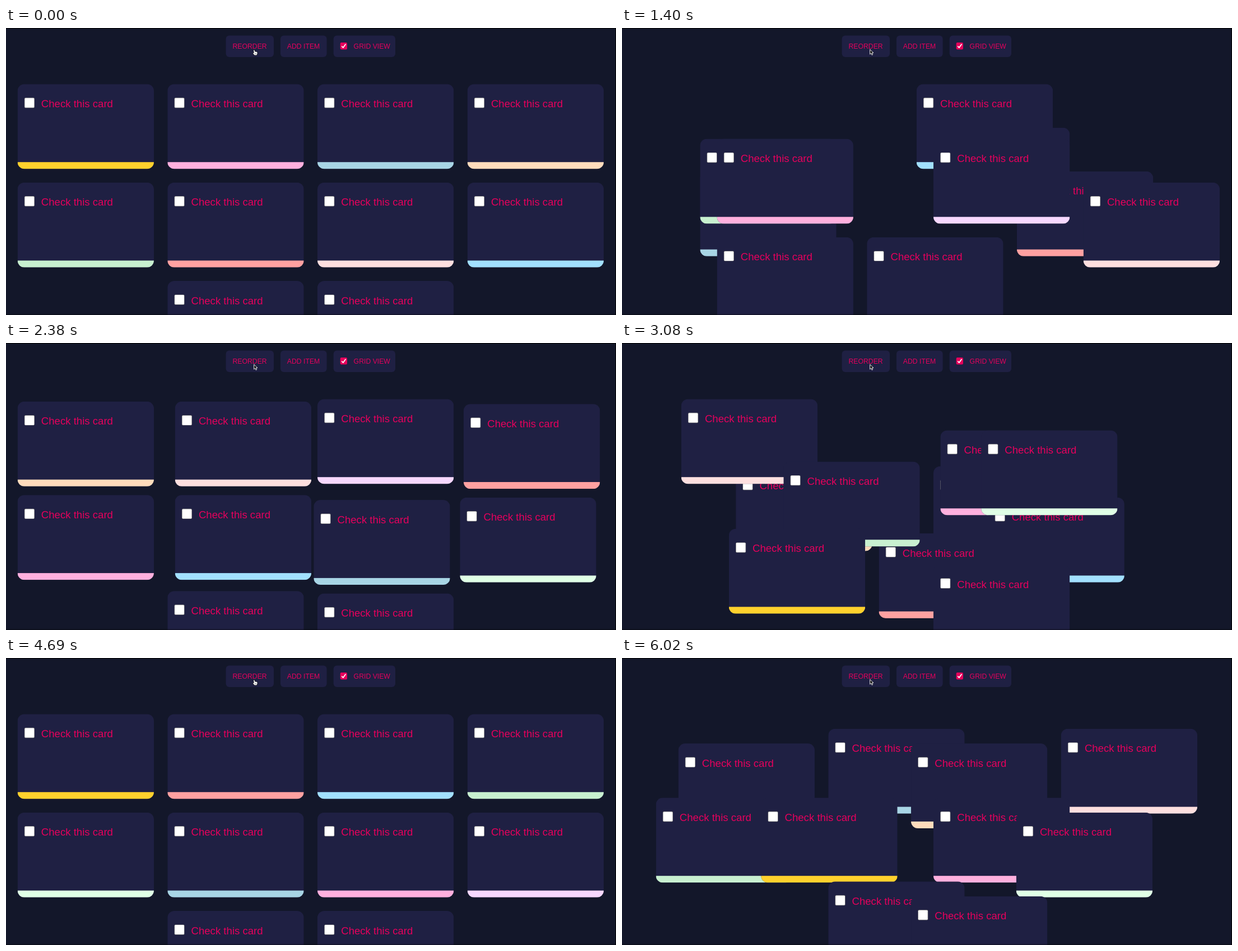
These frames come from a looping animation (1089 px wide and 514 px high, 6090 ms). An HTML page with a canvas:

```html
<!DOCTYPE html>
<html lang="en">
<head>
<meta charset="utf-8">
<title>Card shuffle</title>
<style>
  html, body { margin: 0; width: 100%; height: 100%; overflow: hidden; background: #13172a; }
  canvas { display: block; width: 1089px; height: 514px; }
</style>
</head>
<body>
<canvas id="stage" width="1089" height="514"></canvas>
<script>
const ctx = document.getElementById('stage').getContext('2d');
const WIDTH = 1089, HEIGHT = 514;
const LOOP = 6090, TICK = 70, MOVE = 400;
const PANEL = '#1f2043', ACCENT = '#e6005c';
const FONT = '"Liberation Sans", Arial, sans-serif';
const CARD = { w: 243.4, h: 152, r: 12.2, bar: 12.2 };

const colors = {
  Y: '#ffd12d', P: '#ffb0de', T: '#a8d5e5', O: '#ffdcbc', G: '#c8f0d0',
  S: '#ffa1a1', R: '#fddfdf', B: '#a2e0ff', L: '#f7d8ff', M: '#e0ffe6'
};

// Each shuffle moves the cards from the previous order into this one.
const firstOrder = 'YPTOGSRBLM';
const shuffles = [
  { at: 220, order: 'TBYSGPLROM' },
  { at: 1329, order: 'PGLBOMYRTS' },
  { at: 2097, order: 'ORLSPBTMGY' },
  { at: 2953, order: 'RGMPYOLBST' },
  { at: 3849, order: 'YSBGMTPLRO' },
  { at: 4809, order: 'STORGYPMLB' },
  { at: 5999, order: 'YGPLMBRTOS' }
];

function slot(i) {
  const row = Math.floor(i / 4);
  const col = i % 4 + (row === 2 ? 1 : 0); // the short last row is centred
  return { x: 20.6 + col * 267.7, y: 100.4 + row * 176.3 };
}

function roundRect(x, y, w, h, r) {
  ctx.beginPath();
  ctx.roundRect(x, y, w, h, r);
}

function fillRound(x, y, w, h, r, color) {
  ctx.fillStyle = color;
  roundRect(x, y, w, h, r);
  ctx.fill();
}

function label(text, x, y, size) {
  ctx.font = `${size}px ${FONT}`;
  ctx.fillStyle = ACCENT;
  ctx.fillText(text, x, y);
}

function drawCard(x, y, color) {
  ctx.save();
  roundRect(x, y, CARD.w, CARD.h, CARD.r);
  ctx.clip();
  ctx.fillStyle = PANEL;
  ctx.fillRect(x, y, CARD.w, CARD.h);
  ctx.fillStyle = color;
  ctx.fillRect(x, y + CARD.h - CARD.bar, CARD.w, CARD.bar);
  ctx.restore();

  fillRound(x + 12.2, y + 24.4, 18.2, 18.4, 2, '#767676');
  fillRound(x + 12.9, y + 25.1, 16.8, 17, 1.5, '#fff');
  label('Check this card', x + 42.2, y + 41.6, 18.6);
}

function drawToolbar() {
  fillRound(392.6, 13.6, 85.4, 38.4, 6, PANEL);
  fillRound(490, 13.6, 82.6, 38.4, 6, PANEL);
  fillRound(584.7, 13.6, 110.3, 38.4, 6, PANEL);
  label('REORDER', 404.4, 37.2, 12.25);
  label('ADD ITEM', 501.8, 37.2, 12.25);
  label('GRID VIEW', 620.6, 37.2, 12.25);

  fillRound(596.7, 26, 12.3, 12.4, 2, ACCENT);
  ctx.strokeStyle = '#fff';
  ctx.lineWidth = 1.8;
  ctx.beginPath();
  ctx.moveTo(599.3, 32.5);
  ctx.lineTo(601.8, 35.2);
  ctx.lineTo(606.5, 28.8);
  ctx.stroke();
}

function polygon(points) {
  ctx.beginPath();
  points.forEach(([x, y]) => ctx.lineTo(x, y));
  ctx.closePath();
}

function drawArrow() {
  polygon([[442.7, 38.4], [442.7, 47], [444.7, 45.2], [446.1, 48.4],
    [447.6, 47.7], [446.2, 44.7], [449, 44.5]]);
  ctx.fillStyle = '#111';
  ctx.fill();
  ctx.strokeStyle = '#fff';
  ctx.lineWidth = 0.9;
  ctx.stroke();
}

function drawHand() {
  polygon([[442, 39.5], [443.2, 39.2], [444.5, 42.4], [447.4, 42.7], [448.6, 43.8],
    [448.4, 46.2], [447.5, 48.6], [443.6, 48.6], [440.8, 45], [441.6, 44.4], [443, 45.2]]);
  ctx.lineJoin = 'round';
  ctx.strokeStyle = '#111';
  ctx.lineWidth = 1.4;
  ctx.stroke();
  ctx.fillStyle = '#fff';
  ctx.fill();
  ctx.fillStyle = '#333';
  ctx.fillRect(444.5, 45, 0.6, 2.2);
  ctx.fillRect(446.3, 45, 0.6, 2.2);
}

function drawCards(from, to, progress) {
  const eased = 1 - (1 - progress) ** 3;
  // Stacking follows the order before the shuffle.
  [...from].forEach((id, i) => {
    const a = slot(i), b = slot(to.indexOf(id));
    drawCard(a.x + (b.x - a.x) * eased, a.y + (b.y - a.y) * eased, colors[id]);
  });
}

function render(time) {
  let from = firstOrder, to = firstOrder, progress = 1;
  for (const { at, order } of shuffles) {
    if (time < at) break;
    from = to;
    to = order;
    progress = Math.min(1, (time - at) / MOVE);
  }

  ctx.fillStyle = '#13172a';
  ctx.fillRect(0, 0, WIDTH, HEIGHT);
  drawToolbar();
  drawCards(from, to, progress);
  if (progress < 1) drawArrow(); else drawHand();

  ctx.fillStyle = '#000';
  ctx.fillRect(0, 0, WIDTH, 1);
  ctx.fillRect(WIDTH - 1, 0, 1, HEIGHT);
  ctx.fillStyle = 'rgba(0, 0, 0, 0.3)';
  ctx.fillRect(0, HEIGHT - 2, WIDTH, 2);
}

function loop() {
  const time = performance.now() % LOOP;
  render(Math.floor(time / TICK) * TICK);
  requestAnimationFrame(loop);
}
loop();
</script>
</body>
</html>
```
